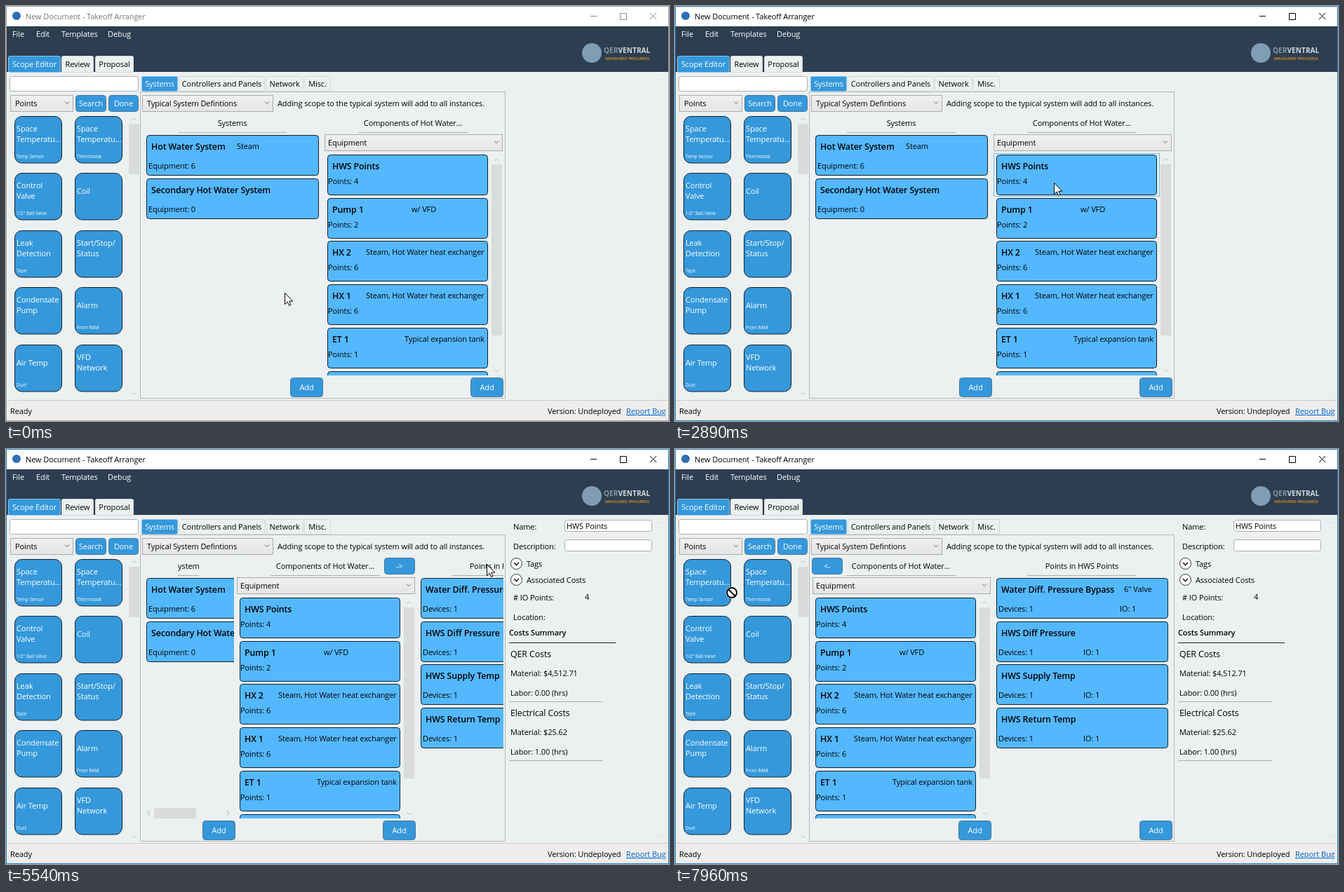
Animation, 945 px wide and 592 px high, one loop 8000 ms. Source, as an HTML page:

```html
<!DOCTYPE html>
<html lang="en">
<head>
<meta charset="utf-8">
<title>Estimating tool</title>
<style>
html, body { margin: 0; width: 100%; height: 100%; overflow: hidden; background: #ecf0f1; }
svg { display: block; }
text { font: 11px "Open Sans", "Noto Sans", sans-serif; letter-spacing: -.1px; fill: #000; white-space: pre; }
.w { fill: #fff; }
.m { text-anchor: middle; }
.big { font-size: 12.4px; }
.t { font-size: 12.4px; font-weight: 600; letter-spacing: -.12px; }
.s { font-weight: 600; }
.tiny { font-size: 6.5px; letter-spacing: 0; fill: #fff; }
.link { fill: #06c; text-decoration: underline; }
.brand { font: 700 10px "Open Sans", sans-serif; letter-spacing: .1px; fill: #d3d8dc; }
.tag { font: 600 5.9px "Open Sans", sans-serif; letter-spacing: 0; fill: #e8961e; }
</style>
</head>
<body>
<svg id="stage" width="945" height="592" viewBox="0 0 945 592"></svg>
<script>
const BLUE = '#3498db', BG = '#ecf0f1', GREY = '#acacac';
const SLIDE = 258;

const text = (x, y, s, c = '') => `<text x="${x}" y="${y}" class="${c}">${s}</text>`;
const rect = (x, y, w, h, fill, stroke, r = 0) => stroke
  ? `<rect x="${x + .5}" y="${y + .5}" width="${w - 1}" height="${h - 1}" rx="${r}" fill="${fill}" stroke="${stroke}"/>`
  : `<rect x="${x}" y="${y}" width="${w}" height="${h}" rx="${r}" fill="${fill}"/>`;
const line = (x, y, w, c = GREY) => rect(x, y, w, 1, c);
const chevron = (x, y, d = 1, c = '#666') =>
  `<path d="M${x - 3} ${y - 1.5 * d}l3 ${3 * d} 3 ${-3 * d}" fill="none" stroke="${c}"/>`;
const group = (id, s) => `<g id="${id}">${s}</g>`;
const clip = (id, x, y, w, h) =>
  `<clipPath id="${id}"><rect x="${x}" y="${y}" width="${w}" height="${h}"/></clipPath>`;

const button = (x, y, w, h, s) =>
  rect(x, y, w, h, BLUE, '#4a7896', 4) + text(x + w / 2, y + h / 2 + 4, s, 'w m');
const combo = (x, y, w, s, dx = 7) =>
  rect(x, y, w, 24, 'url(#shade)', GREY) + text(x + dx, y + 16, s) + chevron(x + w - 9, y + 11);
const input = (x, y, w, h, s = '') => rect(x, y, w, h, '#fff', '#abadb3', 3) + text(x + 3, y + 12.5, s);
const scroller = (x, top, bottom, y, h) =>
  rect(x, y, 15, h, '#d9dbdc') + chevron(x + 7.5, top, -1, '#b4b8ba') + chevron(x + 7.5, bottom, 1, '#b4b8ba');
const card = (x, y, w, title, sub, parts = '') =>
  rect(x, y, w, 58, '#54b8ff', '#10202c', 4) + text(x + 7, y + 20.7, title, 't') + sub + parts;

function tile([a, b, sub], i) {
  const x = i % 2 ? 98 : 12, y = Math.round(157 + 81.4 * (i >> 1));
  return rect(x, y, 68, 67.5, BLUE, '#13202b', 10) +
    (b ? text(x + 3, y + 22, a, 'w') + text(x + 3, y + 37, b, 'w') : text(x + 3, y + 29.5, a, 'w')) +
    text(x + 3, y + 59.5, sub || '', 'tiny');
}

const tiles = [
  ['Space', 'Temperatu...', 'Temp Sensor'], ['Space', 'Temperatu...', 'Thermostat'],
  ['Control', 'Valve', '1/2" Ball Valve'], ['Coil'],
  ['Leak', 'Detection', 'Tape'], ['Start/Stop/', 'Status'],
  ['Condensate', 'Pump'], ['Alarm', '', 'From RAM'],
  ['Air Temp', '', 'Duct'], ['VFD', 'Network']
].map(tile).join('');

const tab = (x, y, w, h, s, on) =>
  rect(x, y, w, h, on ? BLUE : BG, on ? '#8fc3e8' : '#d3d8da', 2) + text(x + w / 2, y + h / 2 + 4.2, s, on ? 'w m' : 'm');

const frame = rect(0, 0, 945, 592, BG) + rect(0, 0, 945, 29, '#fff') +
  rect(0, 29, 945, 65, '#2c3e50') +
  '<circle cx="15" cy="14" r="6" fill="#2f6fb5"/>' +
  group('title', text(28, 19, 'New Document - Takeoff Arranger') +
    '<path d="M833 14.5h9M875.5 10.5h9v9h-9zM918 10l9 9M927 10l-9 9" fill="none" stroke="currentColor"/>') +
  [[9, 'File'], [43, 'Edit'], [79, 'Templates'], [145, 'Debug']].map(m => text(m[0], 44, m[1], 'w')).join('') +
  tab(3, 71, 75, 24, 'Scope Editor', 1) + tab(79, 71, 46, 24, 'Review') + tab(127, 71, 55, 24, 'Proposal') +
  '<circle cx="835" cy="67" r="14" fill="#7f9db5"/>' +
  text(852, 67, '<tspan fill="#8a979f">QER</tspan>VENTRAL', 'brand') + text(854, 77, 'MEASURED PROGRESS', 'tag') +
  rect(0, 562, 945, 30, '#f0eded') + line(0, 562, 945, '#c9cccd') +
  text(6, 582, 'Ready') + text(772, 582, 'Version: Undeployed') + text(884, 582, 'Report Bug', 'link');

const library = input(5, 100, 184, 22) + combo(6, 127, 90, 'Points') +
  button(99, 127, 44, 24, 'Search') + button(146, 127, 43, 24, 'Done') +
  tiles + scroller(175, 161, 553, 168, 72);

const panel = rect(191, 122, 521, 438, BG, '#b4b8ba') +
  tab(193, 100, 52, 22, 'Systems', 1) + tab(246, 100, 123, 22, 'Controllers and Panels') +
  tab(370, 100, 54, 22, 'Network') + tab(425, 100, 38, 22, 'Misc.') +
  combo(194, 127, 187, 'Typical System Defintions') +
  text(387, 143, 'Adding scope to the typical system will add to all instances.');

const systems =
  `<g clip-path="url(#headClip)"><text id="sysHead" y="171" class="m">Systems</text>${line(245, 180, 155)}</g>` +
  '<g clip-path="url(#sysClip)">' +
  card(200, 184, 246, 'Hot Water System', text(203, 232, 'Equipment: 6'), text(329, 204, 'Steam')) +
  card(200, 246, 246, 'Secondary Hot Water System', text(203, 294, 'Equipment: 0')) + '</g>' +
  group('hbar', `<path d="M205 516l-3 3.5 3 3.5" fill="none" stroke="#a5a9ab"/>
    <path id="hbarEnd" d="M0 516l3 3.5-3 3.5" fill="none" stroke="#a5a9ab"/>
    <rect id="hbarThumb" x="211" y="512" height="15" fill="#d9dbdc"/>`) +
  group('sysAdd', button(405, 530, 47, 28, 'Add'));

const rowTop = i => Math.floor(212.3 + 61.75 * i);
const pointTop = i => Math.floor(184.3 + 61.75 * i);
const equipment = [
  ['HWS Points', 4], ['Pump 1', 2, 578, 'w/ VFD'],
  ['HX 2', 6, 513, 'Steam, Hot Water heat exchanger'], ['HX 1', 6, 513, 'Steam, Hot Water heat exchanger'],
  ['ET 1', 1, 568, 'Typical expansion tank'], ['ET 2', 1]
].map(([n, pts, x, d], i) => {
  const y = rowTop(i);
  return card(458, y, 229, n, text(459, y + 42, 'Points: ' + pts), d ? text(x, y + 20, d) : '');
}).join('');

const middle = group('mid',
  text(580, 171, 'Components of Hot Water...', 'm') + line(502, 180, 156) +
  group('next', button(664, 155, 44, 24, '-&gt;')) +
  combo(454, 183, 254, 'Equipment', 5) +
  '<g clip-path="url(#listClip)"><rect id="hover" x="454.5" width="236" height="61"/>' + equipment + '</g>' +
  scroller(692, 219, 520, 226, 244) + button(662, 530, 47, 28, 'Add'));

const points = group('pts',
  text(580, 171, 'Points in HWS Points', 'm') + line(502, 180, 156) +
  '<rect id="ptHover" x="454.5" width="252" height="61" fill="#e5f3fb" stroke="#70c0e7"/>' +
  ['Water Diff. Pressure Bypass', 'HWS Diff Pressure', 'HWS Supply Temp', 'HWS Return Temp'].map((n, i) => {
    const y = pointTop(i);
    return card(458, y, 245, n, text(461, y + 48, 'Devices: 1'),
      text(i ? 582 : 634, y + 48, 'IO: 1') + (i ? '' : text(640, y + 20, '6" Valve')));
  }).join('') + button(662, 530, 47, 28, 'Add'));

const expander = (y, s) => `<circle cx="727.5" cy="${y}" r="8" fill="#fff" stroke="#333"/>` +
  `<path d="M724 ${y - 1.5}l3.5 3.5 3.5-3.5" fill="none" stroke="#222" stroke-width="1.6"/>` + text(742, y + 4.5, s);
const costs = (y, name, material, labor) => text(719, y, name, 'big') +
  text(719, y + 27, 'Material: $' + material) + text(719, y + 55, `Labor: ${labor} (hrs)`) + line(717, y + 63, 134);

const details = group('details',
  text(723, 115, 'Name:') + input(796, 101, 125, 17, 'HWS Points') +
  text(723, 143, 'Description:') + input(796, 129, 125, 17) +
  expander(163.5, 'Tags') + expander(186.5, 'Associated Costs') +
  text(723, 216, '# IO Points:') + text(825, 214.5, '4') + text(723, 244, 'Location:') +
  text(717, 266, 'Costs Summary', 's') + line(717, 276, 152, '#222') +
  costs(297, 'QER Costs', '4,512.71', '0.00') + costs(381, 'Electrical Costs', '25.62', '1.00'));

const stage = document.getElementById('stage');
stage.innerHTML = '<defs><linearGradient id="shade" x2="0" y2="1"><stop stop-color="#f0f0f0"/>' +
  '<stop offset="1" stop-color="#e5e5e5"/></linearGradient>' +
  clip('panelClip', 194, 150, 515, 409) + clip('listClip', 454, 207, 238, 320) +
  clip('sysClip', 196, 182, 254, 345) + clip('headClip', 245, 155, 155, 30) + '</defs>' +
  frame + library + panel +
  `<g clip-path="url(#panelClip)">${group('sys', systems)}${middle}${points}${group('back', button(195, 155, 44, 24, '&lt;-'))}</g>` +
  details + chevron(934.5, 105, -1, '#d6dadc') + chevron(934.5, 553, 1, '#d6dadc') +
  '<rect id="edge" x=".5" y=".5" width="944" height="591" fill="none"/>' +
  group('arrow', '<path d="M.5.5v16l3.7-3.5 2.4 5.4 2.4-1-2.3-5.3h5.1z" fill="#fff" stroke="#000"/>') +
  group('noDrop', '<circle r="8.5" fill="#fff"/>' +
    '<path d="M7 0A7 7 0 1 1-7 0A7 7 0 1 1 7 0M-5-5L5 5" fill="none" stroke="#000" stroke-width="2"/>');

const el = id => document.getElementById(id);
const set = (id, o) => { for (const k in o) el(id).setAttribute(k, o[k]); };
const show = (id, on) => set(id, { visibility: on ? 'visible' : 'hidden' });
const move = (id, x, y = 0) => set(id, { transform: `translate(${x} ${y})` });
const clipWidth = (id, w) => el(id).firstChild.setAttribute('width', Math.max(0, w));

const smooth = u => u * u * (3 - 2 * u), out = u => u * (2 - u), even = u => u;
// start, end, steps, target x, target y, easing, bow
const moves = [
  [550, 1090, 8, 532, 293.5, smooth, 0],
  [1710, 2180, 7, 540, 252, smooth, 0],
  [3420, 3490, 2, 537, 252, even, 0],
  [4740, 5300, 8, 685, 164, out, 0],
  [6100, 6650, 8, 356, 270, smooth, 32],
  [6880, 6880, 1, 355, 270, even, 0],
  [7200, 7707, 7, 46, 184, smooth, 0],
  [7791, 7960, 3, 81, 205, even, 0]
];
const slides = [[5380, .03], [5460, .23], [5540, .4845], [5640, .8], [5710, 1]];

function pointer(t) {
  let x = 397, y = 409;
  for (const [a, b, n, tx, ty, ease, bow] of moves) {
    if (t < a) break;
    const gap = (b - a) / (n - 1) || 1;
    const u = ease(Math.min(n, Math.floor((t - a) / gap + 1.001)) / n);
    x += (tx - x) * u;
    y += (ty - y) * u + bow * Math.sin(Math.PI * u);
  }
  return [Math.round(x), Math.round(y)];
}

function draw(t) {
  const [x, y] = pointer(t);
  const p = slides.reduce((v, [at, to]) => t >= at ? to : v, 0), dx = Math.round(SLIDE * p);
  const active = t >= 2890, opened = t >= 3140;

  el('title').style.color = active ? '#000' : '#888';
  el('title').firstChild.style.fill = active ? '#000' : '#777';
  set('edge', { stroke: active ? '#1883d7' : '#a8a8a8' });
  show('details', opened);
  show('next', opened && p < 1);
  show('back', p === 1);
  show('sys', p < 1);
  show('hbar', p > 0 && p < 1);

  const room = 250 - dx;
  set('hbarEnd', { transform: `translate(${190 + room} 0)` });
  set('hbarThumb', { width: Math.max(0, Math.min(60 * room / 125, room - 34)) });
  clipWidth('sysClip', room + 4);
  clipWidth('headClip', 155 - dx);
  set('sysHead', { x: 245 + (155 - dx) / 2 });
  move('sysAdd', -dx);
  move('mid', -dx);
  move('pts', SLIDE - dx);

  const row = Math.floor((y - 210) / 61.75);
  const over = t < 5300 && x >= 454 && x < 691 && row >= 0 && row < 5;
  const picked = opened && t < 5300;
  show('hover', over || picked);
  set('hover', {
    y: rowTop(picked ? 0 : row) - 1.5,
    fill: picked ? '#cbe8f6' : '#e5f3fb', stroke: picked ? '#26a0da' : '#70c0e7'
  });
  const ptRow = Math.floor((y - 182) / 61.75);
  show('ptHover', p === 1 && x >= 454 && x < 707 && ptRow >= 0 && ptRow < 4);
  set('ptHover', { y: pointTop(ptRow) - 1.5 });

  const drag = t >= 7791;
  show('arrow', !drag);
  show('noDrop', drag);
  move(drag ? 'noDrop' : 'arrow', x, y);
}

const t0 = performance.now();
function tick() {
  draw((performance.now() - t0) % 8000);
  requestAnimationFrame(tick);
}
tick();
</script>
</body>
</html>
```
